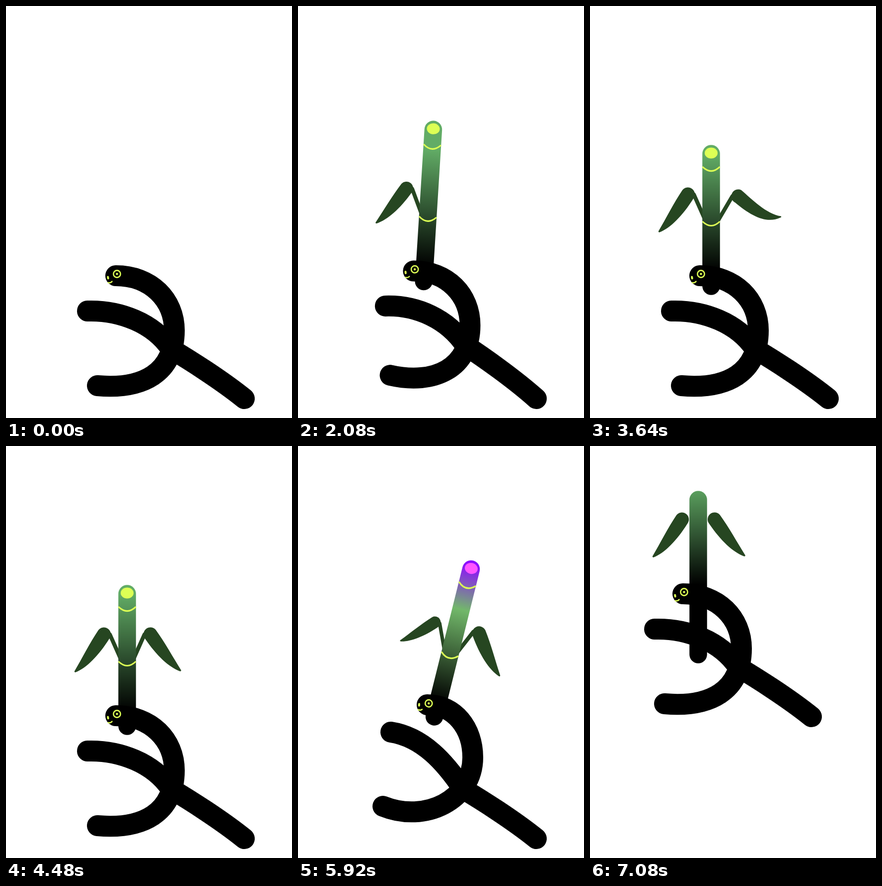
Animation, 576 px wide and 828 px high, one loop 8 s. Source, as an HTML page with a canvas:

```html
<!DOCTYPE html>
<html lang="en">
<head>
<meta charset="utf-8">
<title>Bamboo creature</title>
<style>
html, body { margin: 0; width: 100%; height: 100%; overflow: hidden; background: #fff; }
canvas { display: block; }
</style>
</head>
<body>
<canvas width="576" height="828"></canvas>
<script>
const ctx = document.querySelector('canvas').getContext('2d');
const LOOP = 8000, LIME = '#ddff55', LEAF = '#264621', FOOT = [480, 789];

// Resting position of each body point, and how far it moves when raised or swayed
const BODY = {
  head:  { rest: [221, 542], raise: [58, -48], sway: [39, -22] },
  bend:  { rest: [339, 652], raise: [38, -52], sway: [13, -26] },
  tail:  { rest: [184, 763], raise: [8, -106], sway: [-13, -39] },
  arm:   { rest: [164, 613], raise: [60, -51], sway: [23, -38] },
  joint: { rest: [332, 689], raise: [25, -36], sway: [0, 0] },
};

const clamp = x => Math.max(0, Math.min(1, x));
const ramp = (t, a, b) => clamp((t - a) / (b - a));
const ease = (t, a, b) => { const x = ramp(t, a, b); return x * x * (3 - 2 * x); };
const pulse = (t, a, b, c, d) => ease(t, a, b) - ease(t, c, d);
const bump = (t, mid, reach) => Math.cos(clamp(Math.abs(t - mid) / reach) * Math.PI / 2) ** 2;
const rad = deg => deg * Math.PI / 180;
const mix = (a, b, k) => `rgb(${a.map((v, i) => Math.round(v + (b[i] - v) * k))})`;

function motion(t) {
  const raise = pulse(t, 40, 950, 1280, 2400) + 0.3 * bump(t, 3100, 450);
  const lead = pulse(t, 4480, 5300, 5950, 6720);   // the tail moves before the head
  const sway = pulse(t, 5360, 5920, 5950, 6720);
  return {
    raise, lead, sway,
    lean: 18.2 * raise + 14 * sway - 0.8 * (lead - sway),
    exit: ease(t, 6720, 7080),
    purple: pulse(t, 4480, 5250, 6000, 6650),
    length: 318 * ramp(t, 100, 2160) - 52 * ease(t, 2160, 2700)
      + 111 * pulse(t, 4560, 5360, 5360, 6300) + 45 * ease(t, 6720, 7080),
  };
}

function place(name, m) {
  const { rest, raise, sway } = BODY[name], s = name === 'tail' ? m.lead : m.sway;
  return rest.map((v, i) => v + raise[i] * m.raise + sway[i] * s);
}

function stroke(color, width, draw) {
  if (width < 0.05) return;
  ctx.strokeStyle = color;
  ctx.lineWidth = width;
  ctx.beginPath();
  draw();
  ctx.stroke();
}

function ellipse(x, y, rx, ry, color) {
  ctx.fillStyle = color;
  ctx.beginPath();
  ctx.ellipse(x, y, rx, ry, 0, 0, 7);
  ctx.fill();
}

function leaf(side, grown, size, tilt, angle, bend, exit) {
  if (!grown) return;
  const len = 76 * grown;
  const x = 4 + len * Math.sin(rad(tilt)), y = -115 - len * Math.cos(rad(tilt));
  ctx.save();
  ctx.scale(side, 1);
  stroke(LEAF, (3 + 5 * size) * (1 - exit), () => {
    ctx.moveTo(4, -115);
    ctx.lineTo(x, y);
  });
  ctx.translate(x + 12 * size - 14 * exit, y - 87 * exit);
  ctx.rotate(-rad(angle));
  ctx.scale(size, size);
  ctx.fillStyle = LEAF;
  ctx.beginPath();
  ctx.moveTo(14, 0);
  ctx.bezierCurveTo(13 - bend / 2, 30, 7 - bend, 65, 1, 95);
  ctx.quadraticCurveTo(0, 97, -2, 95);
  ctx.bezierCurveTo(-12 - bend, 75, -17 - bend / 2, 40, -14, 0);
  ctx.arc(0, 0, 14, Math.PI, 0);
  ctx.fill();
  ctx.restore();
}

function leaves(t, m) {
  const settle = bump(t, 2760, 600);
  const flap = bump(t, 4200, 270) + bump(t, 5080, 440);
  leaf(-1, ease(t, 900, 1700), ease(t, 1450, 2150) * (1 - 0.17 * m.sway),
    24 + 18 * (settle + flap), 38 - 21 * settle + 47 * flap + 10 * m.sway,
    2 + 20 * flap, m.exit);

  const swing = bump(t, 3500, 500) + 0.4 * bump(t, 5200, 500);
  leaf(1, ease(t, 2200, 3000), ease(t, 2750, 3450),
    24 - 7 * bump(t, 2760, 400) + 8 * swing, 40 + 30 * swing, 2 + 15 * swing, m.exit);
}

function node(y, width) {
  ctx.lineCap = 'butt';
  stroke(LIME, width, () => {
    ctx.moveTo(-17.5, y);
    ctx.quadraticCurveTo(0, y + 17, 17.5, y);
  });
  ctx.lineCap = 'round';
}

function plant(t, m, x, y) {
  const { length, purple, exit } = m, top = pulse(t, 1450, 1850, 6600, 6840);
  ctx.save();
  ctx.translate(x, y);
  ctx.rotate(rad(m.lean));
  leaves(t, m);

  const green = [98 + 16 * purple, 172 + 12 * purple, 102 + 4 * purple];
  const fill = ctx.createLinearGradient(0, 0, 0, -400);
  fill.addColorStop((30 + 110 * exit) / 400, '#000');
  fill.addColorStop((266 - 44 * purple + 79 * exit) / 400, mix(green, green, 0));
  fill.addColorStop((360 - 45 * purple) / 400, mix(green, [140, 12, 255], purple));
  stroke(fill, 35.5 * ease(t, 100, 500), () => {
    ctx.moveTo(0, 0);
    ctx.lineTo(0, -length);
  });
  node(-130, 3 * pulse(t, 880, 1100, 6600, 6840));
  node(-length * 0.887 - 4, 3 * top);
  ellipse(0, -length - 1.5, 13 * top, 11 * top, mix([221, 255, 85], [255, 85, 255], purple));
  ctx.restore();
}

function face(x, y, lean) {
  ctx.save();
  ctx.translate(x, y);
  ctx.rotate(rad(lean));
  stroke(LIME, 2.6, () => ctx.arc(2.5, -3.5, 7.1, 0, 7));
  ellipse(2.5, -3.5, 2.2, 2.2, LIME);
  stroke(LIME, 4, () => {
    ctx.moveTo(-15.8, 2.5);
    ctx.lineTo(-15.3, 5.5);
  });
  stroke(LIME, 2.6, () => {
    ctx.moveTo(-15, 14);
    ctx.quadraticCurveTo(-10, 15, -7.5, 11.5);
  });
  ctx.restore();
}

function body(m, [hx, hy]) {
  const [bx, by] = place('bend', m), [tx, ty] = place('tail', m);
  const [ax, ay] = place('arm', m), [jx, jy] = place('joint', m);
  const [fx, fy] = FOOT, dx = fx - jx, dy = fy - jy;
  const curl = rad(5 + 40 * m.raise + 17 * m.lead);
  stroke('#000', 42, () => {
    ctx.moveTo(hx, hy);
    ctx.bezierCurveTo(hx + 0.6 * (bx - hx), hy, bx, by - 0.56 * (by - hy), bx, by);
    ctx.bezierCurveTo(bx, by + 85, tx + 92 * Math.cos(curl), ty + 92 * Math.sin(curl), tx, ty);
    ctx.moveTo(ax, ay);
    ctx.bezierCurveTo(ax + 65, ay - 2 + 12 * m.sway, jx - 35, jy - 52, jx, jy);
    ctx.bezierCurveTo(jx + 0.24 * dx, jy + 0.21 * dy, fx - 0.32 * dx, fy - 0.38 * dy, fx, fy);
  });
}

function draw(t) {
  const m = motion(t), head = place('head', m), [x, y] = head;
  ctx.fillStyle = '#fff';
  ctx.fillRect(0, 0, 576, 828);
  ctx.lineCap = ctx.lineJoin = 'round';
  ctx.save();
  ctx.translate(-34 * m.exit, -245 * m.exit);
  plant(t, m, x + 23 - 0.6 * m.lean + 8 * m.exit, y + 21 + 3 * m.sway + 101 * m.exit);
  body(m, head);
  face(x, y, m.lean);
  ctx.restore();
}

const start = performance.now();
function tick(now) {
  draw(Math.max(0, now - start) % LOOP);
  requestAnimationFrame(tick);
}
draw(0);
requestAnimationFrame(tick);
</script>
</body>
</html>
```
